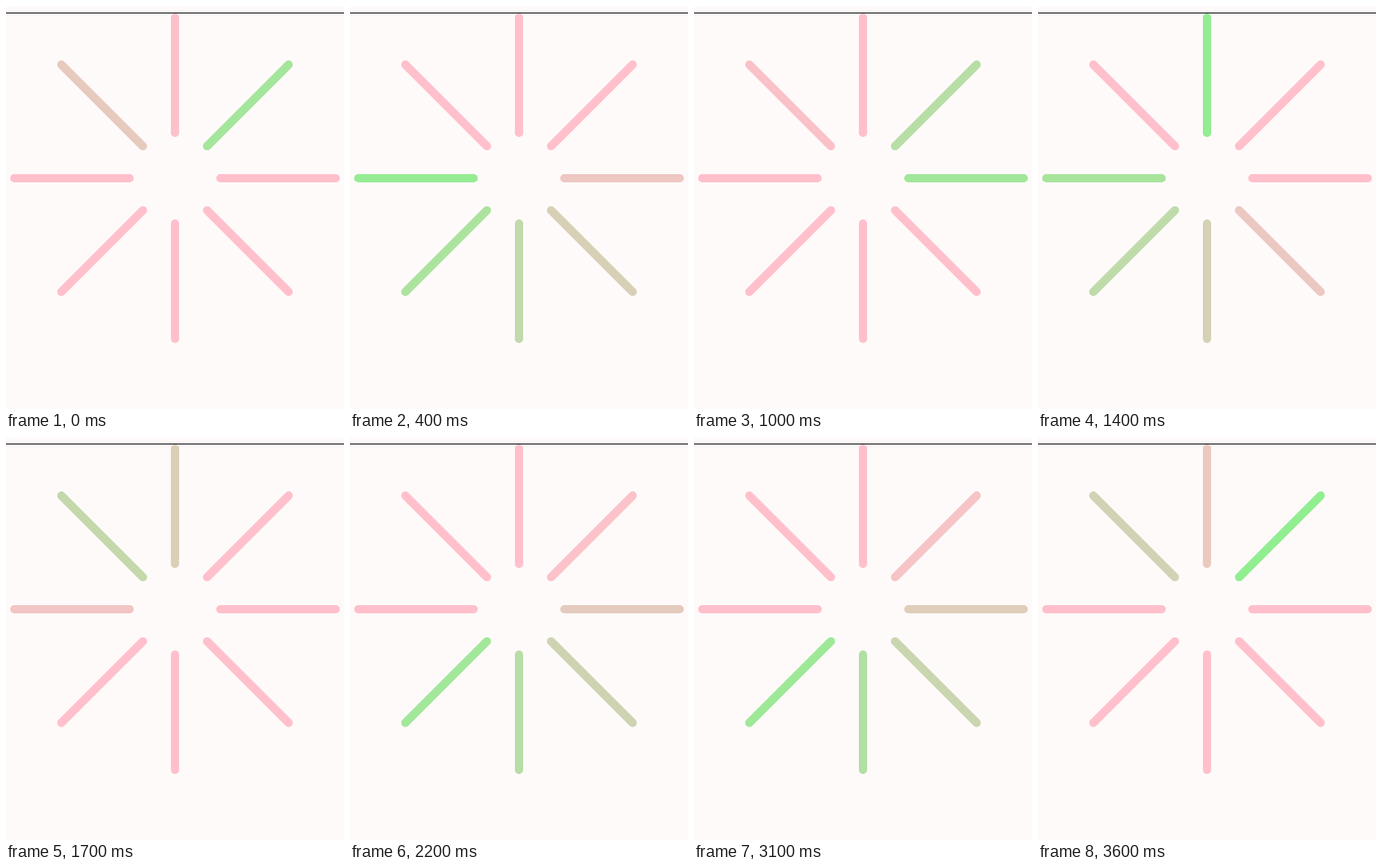
An HTML page for the animation above (3.7 s loop, 410 by 489 pixels).

```html
<!DOCTYPE html>
<html lang="en">
<head>
<meta charset="utf-8">
<title>Spinner</title>
<style>
  html, body { margin: 0; width: 100%; height: 100%; overflow: hidden; background: snow; }
  svg { display: block; }
  line { stroke: pink; stroke-width: 10; stroke-linecap: round; }
</style>
</head>
<body>
<svg width="410" height="489" viewBox="0 0 410 489">
  <rect y="8" width="410" height="1" fill="#000"/>
  <g id="bars" transform="translate(205 209)"></g>
</svg>
<script>
const LOOP = 3700, STEP = 100;
const BARS = 8, SLOTS = 10, FADE = 5;   // two slots per turn stay empty
const FIRST = 0.9, RATE = 1.087;        // slots passed at the start and per step
const PINK = [255, 192, 203], GREEN = [144, 238, 144];

// Bars light clockwise from the upper right; the last two swap places.
const angleOf = slot => 45 * (slot < 6 ? slot + 1 : 14 - slot);

const group = document.getElementById('bars');
const bars = Array.from({ length: BARS }, (_, slot) => {
  const bar = document.createElementNS('http://www.w3.org/2000/svg', 'line');
  bar.setAttribute('y1', -55);
  bar.setAttribute('y2', -195);
  bar.setAttribute('transform', `rotate(${angleOf(slot)})`);
  return group.appendChild(bar);
});

function mix(green) {
  return `rgb(${PINK.map((c, i) => Math.round(c + (GREEN[i] - c) * green))})`;
}

function draw(t) {
  const phase = FIRST + RATE * Math.floor(t / STEP);
  bars.forEach((bar, slot) => {
    const age = (phase - slot + SLOTS) % SLOTS;
    bar.style.stroke = mix(Math.max(0, 1 - age / FADE));
  });
}

const start = performance.now();
function tick() {
  draw((performance.now() - start) % LOOP);
  requestAnimationFrame(tick);
}
tick();
</script>
</body>
</html>
```
